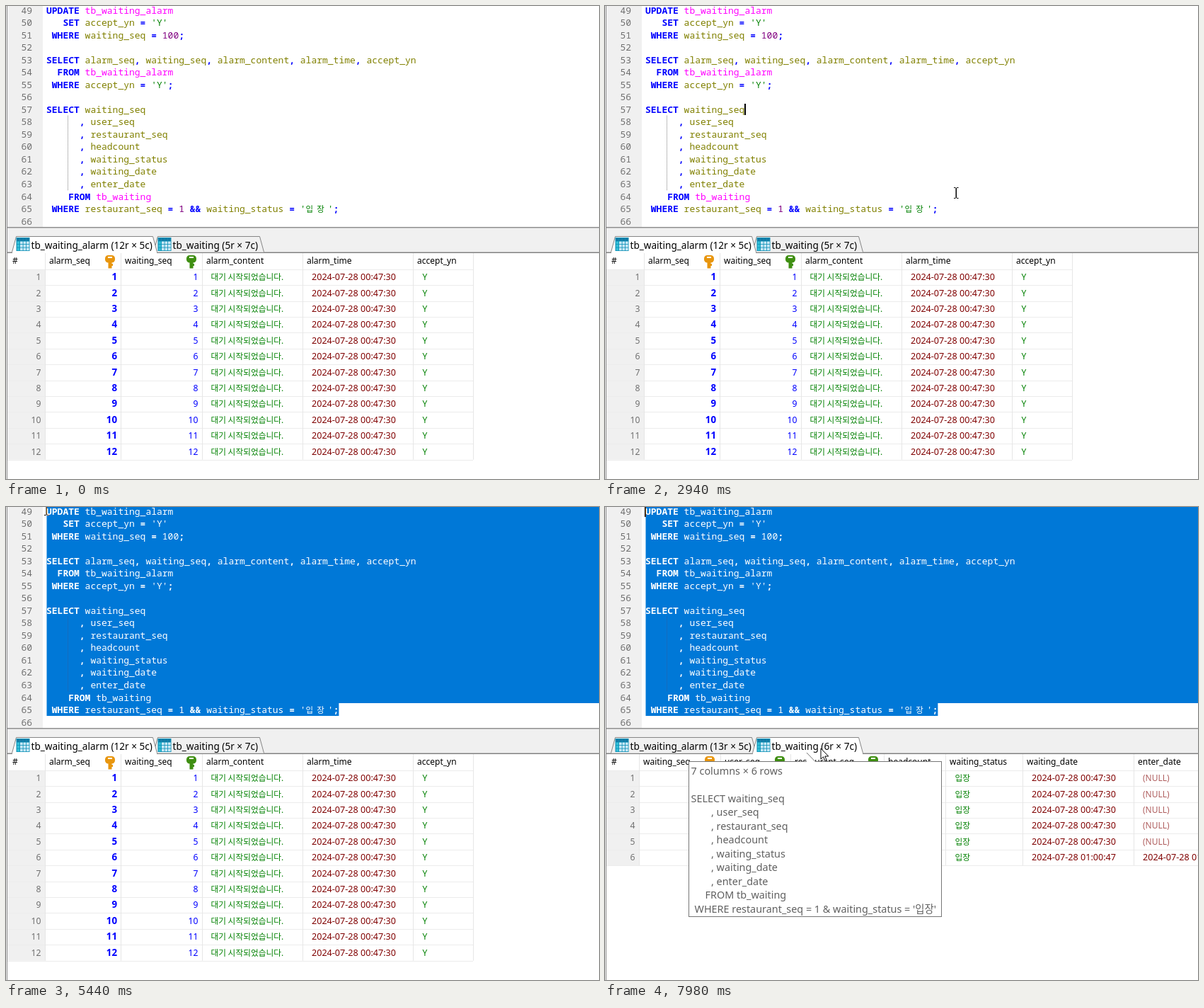
Animation, 838 px wide and 668 px high, one loop 8000 ms. Source, as an HTML page with a canvas:

```html
<!DOCTYPE html>
<html lang="ko">
<head>
<meta charset="utf-8">
<title>SQL editor</title>
<style>
  html, body { margin: 0; width: 100%; height: 100%; overflow: hidden; background: #fff; }
  canvas { display: block; }
</style>
</head>
<body>
<canvas id="stage" width="838" height="668"></canvas>
<script>
const ctx = document.getElementById('stage').getContext('2d');
const W = 838, H = 668, LOOP = 8000;
const MONO = '"Noto Sans Mono", "DejaVu Sans Mono", monospace';
const UI = '"Noto Sans", "Noto Sans CJK KR", sans-serif';
const KR = '"Noto Sans CJK KR", "Noto Sans CJK", sans-serif';
const BLUE = '#0000ff', GREEN = '#008000', MAROON = '#800000';

// ---------- helpers ----------
function rect(x, y, w, h, color) {
  ctx.fillStyle = color;
  ctx.fillRect(x, y, w, h);
}

function text(str, x, y, color, font, align = 'left') {
  ctx.font = font;
  ctx.textAlign = align;
  ctx.fillStyle = color;
  ctx.fillText(str, x, y);
}

function poly(points, fill, stroke, close = true) {
  ctx.beginPath();
  points.forEach(([x, y]) => ctx.lineTo(x, y));
  if (close) ctx.closePath();
  if (fill) { ctx.fillStyle = fill; ctx.fill(); }
  if (stroke) { ctx.strokeStyle = stroke; ctx.lineWidth = 1; ctx.stroke(); }
}

const ramp = (t, a, b) => Math.min(1, Math.max(0, (t - a) / (b - a)));
const within = (t, a, b) => t >= a && t < b;

// ---------- editor ----------
const X0 = 57, CW = 7.8, LH = 17.53, FIRST = 49;
const lines = [
  'UPDATE tb_waiting_alarm',
  "   SET accept_yn = 'Y'",
  ' WHERE waiting_seq = 100;',
  '',
  'SELECT alarm_seq, waiting_seq, alarm_content, alarm_time, accept_yn',
  '  FROM tb_waiting_alarm',
  " WHERE accept_yn = 'Y';",
  '',
  'SELECT waiting_seq',
  '      , user_seq',
  '      , restaurant_seq',
  '      , headcount',
  '      , waiting_status',
  '      , waiting_date',
  '      , enter_date',
  '    FROM tb_waiting',
  " WHERE restaurant_seq = 1 && waiting_status = '입 장 ';",
  ''
];
const LAST = 16;
const lineTop = i => Math.round(-3.2 + LH * i);
const lineBase = i => Math.round(10.6 + LH * i);
const colX = c => X0 + c * CW;

function tokenColor(s) {
  if (/^[A-Z]/.test(s)) return BLUE;
  if (s.startsWith('tb_')) return '#ff00ff';
  if (/^[a-z]/.test(s)) return '#808000';
  if (/^\d/.test(s)) return '#800080';
  return s[0] === "'" ? GREEN : BLUE;
}

function drawCode(mono) {
  lines.forEach((line, i) => {
    const y = lineBase(i);
    for (const m of line.matchAll(/'[^']*'|\w+|[^\s\w']+/g)) {
      const s = m[0], color = mono || tokenColor(s);
      if (s[0] === "'") {
        [...s].forEach((ch, k) => text(ch, colX(m.index + k), y, color,
          ch > '\u1000' ? '11.5px ' + KR : '13px ' + MONO));
      } else {
        const bold = /^[a-z\d]/.test(s) ? '' : 'bold ';
        text(s, colX(m.index), y, color, bold + '13px ' + MONO);
      }
    }
  });
  for (let y = 155; y < 260; y += 2) rect(87, y, 1, 1, mono ? '#2a62a8' : '#808080');
}

function drawEditor(sel) {
  rect(0, 0, W, 313, '#fff');
  rect(2, 0, 50, 313, '#f0f0f0');
  lines.forEach((_, i) => text(FIRST + i, 37, lineBase(i), '#707070', '13px ' + MONO, 'right'));
  drawCode();
  if (!sel) return;
  ctx.save();
  ctx.beginPath();
  for (let i = sel.line; i <= LAST; i++) {
    const x = (i === sel.line ? colX(sel.col) : X0) + 0.5;
    const end = i === LAST ? colX(lines[LAST].length) : W;
    ctx.rect(x, lineTop(i), end - x, lineTop(i + 1) - lineTop(i));
  }
  ctx.clip();
  rect(0, 0, W, 313, '#0078d7');
  drawCode('#fff');
  ctx.restore();
}

function selectionAt(t) {
  if (t < 3230) return null;
  const [x, y] = pointerAt(Math.min(t, 4830));
  const line = Math.max(0, Math.min(LAST, Math.floor((y + 3.2) / LH)));
  const col = Math.max(0, Math.min(lines[line].length, Math.round((x - X0) / CW)));
  return t >= 4830 ? { line: 0, col: 0 } : { line, col };
}

function drawCaret(t, sel) {
  const on = sel
    ? t < 5440 || within(t, 6560, 7040) || t >= 7550
    : within(t, 820, 1350) || within(t, 1880, 2410) || within(t, 2930, 3230);
  if (!on) return;
  const line = sel ? sel.line : 8, col = sel ? sel.col : 18;
  invert(() => ctx.fillRect(Math.round(colX(col)) - (sel ? 1 : 0), lineTop(line) + 1, 2, 16));
}

function invert(draw) {
  ctx.save();
  ctx.globalCompositeOperation = 'difference';
  ctx.fillStyle = '#fff';
  draw();
  ctx.restore();
}

// ---------- result tabs ----------
function tableIcon(x, y) {
  rect(x, y, 19, 19, '#0d8fb5');
  for (let r = 0; r < 4; r++)
    for (let c = 0; c < 4; c++) {
      const color = r === 0 ? '#1279a4' : c === 0 ? '#35c0d8' : '#c9e9f7';
      rect(x + 1 + c * 4.5, y + 1 + r * 4.5, 3.7, 3.7, color);
    }
}

function drawTabs(active, updated) {
  rect(0, 313, W, 36, '#f0f0f0');
  rect(0, 312, W, 1.5, '#909090');
  rect(1, 347.5, W, 1.5, '#828282');
  const tabs = [
    { x: 8, end: 214, label: `tb_waiting_alarm (${updated ? 13 : 12}r × 5c)` },
    { x: 208, end: 365, label: `tb_waiting (${updated ? 6 : 5}r × 7c)` }
  ];
  for (const i of [1 - active, active]) {
    const { x, end, label } = tabs[i];
    const shape = [[x + .5, 347.5], [x + 6.5, 325.5], [end - 6.5, 325.5], [end - .5, 347.5]];
    poly(shape, i === active ? '#fff' : '#f0f0f0', '#858585', false);
    if (i === active) rect(x + 1, 347, end - x - 2, 2, '#fff');
    tableIcon(x + 6.5, 327);
    text(label, x + 27.5, 343, '#000', '13.6px ' + UI);
  }
}

// ---------- result grid ----------
const ROW = 22.41, TOP = 371.8;

function drawKey(x, color) {
  ctx.fillStyle = color;
  ctx.beginPath();
  ctx.roundRect(x - 7, 352, 14, 10.5, 4.5);
  ctx.rect(x - 2.5, 361, 5, 9.5);
  ctx.rect(x + 2, 364, 2, 3);
  ctx.fill();
  rect(x - 3, 354, 6, 2, '#fff');
}

// Column: left edge, title, text x, style, key colour and key x
function drawGrid(cols, end, rows) {
  const left = cols[0].x, bottom = TOP + ROW * rows.length;
  rect(0, 349, W, H - 349, '#fff');
  rect(2, TOP, left - 2, bottom - TOP, '#f0f0f0');
  text('#', 9, 364, '#000', '12px ' + UI);
  for (let i = 0; i <= rows.length; i++)
    rect(2, Math.round(TOP + ROW * i), end - 2, 1, '#ececec');
  for (const x of [...cols.map(c => c.x), end]) rect(x, 349, 1, bottom - 349, '#e6e6e6');
  cols.forEach(c => {
    text(c.title, c.x + 6, 364, '#000', '12px ' + UI);
    if (c.key) drawKey(c.keyX, c.key);
  });
  rows.forEach((row, i) => {
    const y = Math.round(387.2 + ROW * i);
    text(i + 1, left - 5.5, y, '#707070', '12.2px ' + UI, 'right');
    cols.forEach((c, k) => drawCell(row[k], c, y));
  });
}

function drawCell(value, col, y) {
  const x = col.at;
  if (col.type === 'id') text(value, x, y, BLUE, 'bold 13.3px ' + UI, 'right');
  else if (col.type === 'num') text(value, x, y, BLUE, '12.2px ' + UI, 'right');
  else if (col.type === 'kr') text(value, x, y, GREEN, '11.7px ' + KR);
  else if (col.type === 'str') text(value, x, y, GREEN, '12px ' + UI);
  else if (value === '(NULL)') text(value, x, y, '#b06060', '12px ' + UI);
  else text(value, x, y, MAROON, '12.6px ' + UI);
}

const ORANGE_KEY = '#e8960f', GREEN_KEY = '#3f8f12';
const DAY = '2024-07-28 ', EARLY = DAY + '00:47:30', LATE = DAY + '01:00:47';

function drawAlarms(updated) {
  const d = updated ? 68 : 0;
  const cols = [
    { x: 55, title: 'alarm_seq', at: 157, type: 'id', key: ORANGE_KEY, keyX: 147 },
    { x: 162, title: 'waiting_seq', at: 271.5, type: 'num', key: GREEN_KEY, keyX: 262 },
    { x: 277, title: 'alarm_content', at: 289.5, type: 'kr' },
    { x: 419 + d, title: 'alarm_time', at: 432 + d, type: 'date' },
    { x: 575 + d, title: 'accept_yn', at: 588.5 + d, type: 'str' }
  ];
  const rows = Array.from({ length: 12 }, (_, i) =>
    [i + 1, i + 1, '대기 시작되었습니다.', EARLY, 'Y']);
  if (updated) rows.push([100, 100, '고객님의 웨이팅이 등록되었습니다.', LATE, 'Y']);
  drawGrid(cols, 660 + d, rows);
}

function drawWaiting(updated) {
  const cols = [
    { x: 48, title: 'waiting_seq', at: 157, type: 'id', key: ORANGE_KEY, keyX: 148 },
    { x: 163, title: 'user_seq', at: 257, type: 'num', key: GREEN_KEY, keyX: 247 },
    { x: 262, title: 'restaurant_seq', at: 389, type: 'num', key: GREEN_KEY, keyX: 379 },
    { x: 394, title: 'headcount', at: 475.5, type: 'num' },
    { x: 481, title: 'waiting_status', at: 494.5, type: 'kr' },
    { x: 590, title: 'waiting_date', at: 603, type: 'date' },
    { x: 747, title: 'enter_date', at: 760, type: 'date' }
  ];
  const users = [1, 2, 7, 3, 4], heads = [1, 2, 1, 4, 2];
  const rows = users.map((u, i) => [i + 1, u, 1, heads[i], '입장', EARLY, '(NULL)']);
  if (updated) rows.push([100, 1, 1, 2, '입장', LATE, LATE]);
  drawGrid(cols, updated ? 900 : 836, rows);
}

// ---------- tab hints ----------
const waitingHint = n => [[0, `7 columns × ${n} rows`], [0, ''], [0, 'SELECT waiting_seq'],
  ...['user_seq', 'restaurant_seq', 'headcount', 'waiting_status', 'waiting_date', 'enter_date']
    .map(s => [28.5, ', ' + s]),
  [20, 'FROM tb_waiting'], [5, "WHERE restaurant_seq = 1 & waiting_status = '입장'"]];
const alarmHint = [[0, '5 columns × 12 rows'], [0, ''],
  [0, 'SELECT alarm_seq, waiting_seq, alarm_content, alarm_time,'],
  [0, 'accept_yn'], [10, 'FROM tb_waiting_alarm'], [5, "WHERE accept_yn = 'Y'"]];

function drawHint(rows, x, w, stem, alpha) {
  if (alpha <= 0) return;
  const h = rows.length * 19.45 + 6.5;
  ctx.save();
  ctx.globalAlpha = alpha;
  rect(x, 359, w, h, '#fff');
  ctx.strokeStyle = '#767676';
  ctx.lineWidth = 1;
  ctx.strokeRect(x + .5, 359.5, w - 1, Math.round(h) - 1);
  poly([[stem, 360], [stem, 347], [stem + 12.5, 360]], '#fff');
  poly([[stem, 347], [stem + 12, 359.5]], null, '#767676', false);
  rows.forEach(([dx, s], i) =>
    text(s, x + 3.5 + dx, Math.round(378 + 19.45 * i), '#606060', '14.4px ' + UI));
  ctx.restore();
}

function drawHints(t) {
  const fade = (a, b, c, d) => ramp(t, a, b) * (1 - ramp(t, c, d));
  drawHint(waitingHint(5), 118, 358, 285, fade(640, 850, 1150, 1380));
  drawHint(alarmHint, 1, 428, 85, fade(2160, 2360, 2650, 2870));
  drawHint(waitingHint(6), 118, 358, 285, ramp(t, 7280, 7540));
}

// ---------- mouse pointer ----------
const path = [
  [60, 797, 650], [300, 640, 64], [560, 300, 343], [960, 300, 343],
  [1260, 829, 225], [1320, 870, 215], [1560, 870, 190], [1580, 776, 180],
  [1760, 630, 165], [2060, 100, 341], [2560, 100, 341], [2940, 496, 264],
  [3150, 470, 287], [3230, 470, 287], [3970, 252, 195], [4400, 120, 100],
  [4830, 36, 13], [5090, 36, 13], [5240, 57, 4], [6530, 57, 4],
  [6560, 68, 6], [6800, 470, 40], [6900, 415, 92], [6960, 412, 148],
  [7060, 380, 257], [7200, 305, 341], [8000, 305, 341]
];

const slope = (i, k) => (path[i + 1][k] - path[i][k]) / (path[i + 1][0] - path[i][0]);

function tangent(i, k) {
  if (i === 0 || i === path.length - 1) return 0;
  const a = slope(i - 1, k), b = slope(i, k);
  return a * b <= 0 ? 0 : 2 * a * b / (a + b);
}

// Monotone cubic between timed points, so the pointer never overshoots
function pointerAt(t) {
  let i = 0;
  while (i < path.length - 2 && t >= path[i + 1][0]) i++;
  const span = path[i + 1][0] - path[i][0], u = ramp(t, path[i][0], path[i + 1][0]);
  return [1, 2].map(k => {
    const a = path[i][k], b = path[i + 1][k];
    const m = tangent(i, k) * span, n = tangent(i + 1, k) * span;
    const s = u * u * (3 - 2 * u);
    return a + (b - a) * s + m * u * (1 - u) ** 2 - n * u * u * (1 - u);
  });
}

function drawArrow(x, y, dir) {
  const shape = [[0, 0], [0, 15], [3.5, 11.8], [6, 17.5], [8.3, 16.5], [5.8, 11], [10.8, 11]];
  poly(shape.map(([a, b]) => [x + dir * a, y + b]), '#fff', '#000');
}

function drawBeam(x, y) {
  x = Math.round(x);
  y = Math.round(y);
  invert(() => {
    ctx.fillRect(x - .5, y - 7, 1.5, 14);
    for (const dy of [-8, 7]) {
      ctx.fillRect(x - 3, y + dy, 2.5, 1);
      ctx.fillRect(x + 1, y + dy, 2.5, 1);
    }
  });
}

function drawPointer(t) {
  if (t < 60) return;
  const [x, y] = pointerAt(t);
  if (y > 312) drawArrow(x, y, 1);
  else if (x < 50) drawArrow(x, y, -1);
  else drawBeam(x, y);
  const press = ramp(t, 3195, 3225) * (1 - ramp(t, 4890, 4950));
  if (press > 0) {
    ctx.fillStyle = `rgba(255, 238, 40, ${0.75 * press})`;
    ctx.beginPath();
    ctx.arc(x - 2, y - 1, 14.5, 0, Math.PI * 2);
    ctx.fill();
  }
}

// ---------- frame ----------
function draw(t) {
  const updated = t >= 5920;
  const active = within(t, 900, 2390) || t >= 7820 ? 1 : 0;
  const sel = selectionAt(t);
  drawEditor(sel);
  (active ? drawWaiting : drawAlarms)(updated);
  drawTabs(active, updated);
  rect(0, 0, 1, H, '#f4f4f4');
  rect(1, 0, 1, H, '#8c8c8c');
  drawCaret(t, sel);
  drawHints(t);
  drawPointer(t);
}

const start = performance.now();
function tick() {
  draw((performance.now() - start) % LOOP);
  requestAnimationFrame(tick);
}
tick();
</script>
</body>
</html>
```
